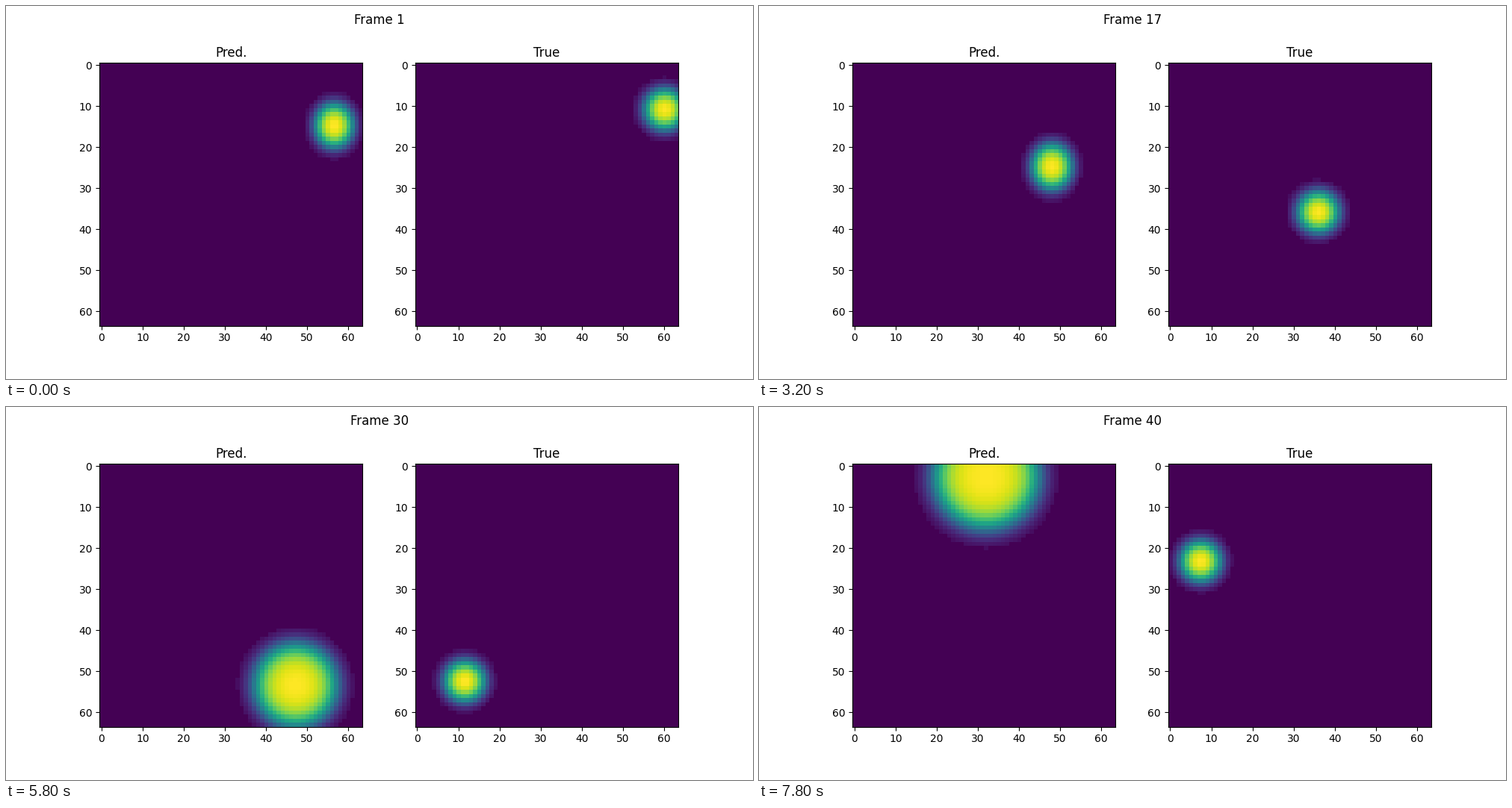
Write a matplotlib script that moves like this. It is 1000 px wide and 500 px high and loops after 8 s.

```python
import numpy as np
import matplotlib.pyplot as plt
from matplotlib.animation import FuncAnimation

SIZE = 64
STEPS = 40
INTERVAL = 200
FAINT = 0.0365  # cells dimmer than this show as background

COLS, ROWS = np.meshgrid(np.arange(SIZE), np.arange(SIZE))

# The predicted spot circles (32, 31): step, angle in degrees, radius, spot size
ORBIT = [
    (1, -33.5, 29.4, 4.9),
    (7, -404.5, 25.5, 3.7),
    (9, -333, 22, 5.5),
    (11, -391.7, 27, 7.2),
    (13, -395, 24, 6.5),
    (17, -741.3, 17.1, 5.1),
    (26, -961.2, 27.2, 9.7),
    (33, -1071.4, 26.8, 9.4),
    (40, -1170, 28.5, 12.2),
]


def bounce(pos, limit=SIZE - 1):
    """Reflect a straight path between two walls."""
    return limit - abs(pos % (2 * limit) - limit)


def blob(x, y, size, squash=1):
    """Logistic spot with half its peak at distance size; larger ones are flatter."""
    dist2 = ((COLS - x) / squash) ** 2 + (ROWS - y) ** 2
    gain = (size / 2.8) ** 2
    img = (gain + 1) / (gain + (gain + 2) ** np.minimum(dist2 / size ** 2, 50))
    img /= img.max()
    return np.where(img < FAINT, 0, img)


def true_image(step):
    x = bounce(47.15 - 1.878 * (step - 11))
    y = bounce(18.3 + 2.913 * (step - 11))
    return blob(x, y, 4.55)


def pred_image(step):
    steps, *tracks = zip(*ORBIT)
    angle, radius, size = (np.interp(step, steps, track) for track in tracks)
    x = 32 + radius * np.cos(np.radians(angle))
    y = 31 + radius * np.sin(np.radians(angle))
    squash = np.interp(size, (5, 7), (0.88, 1))
    return blob(x, y, size, squash)


fig, axes = plt.subplots(1, 2, figsize=(10, 5), dpi=100)
title = fig.suptitle("Frame 1")
sources = (pred_image, true_image)
images = []
for ax, name, source in zip(axes, ("Pred.", "True"), sources):
    ax.set_title(name)
    images.append(ax.imshow(source(1), cmap="viridis", vmin=0, vmax=1))


def update(i):
    step = i + 1
    title.set_text(f"Frame {step}")
    for image, source in zip(images, sources):
        image.set_data(source(step))
    return [title, *images]


anim = FuncAnimation(fig, update, frames=STEPS, interval=INTERVAL,
                     repeat=True, repeat_delay=0, blit=False)
plt.show()
```
